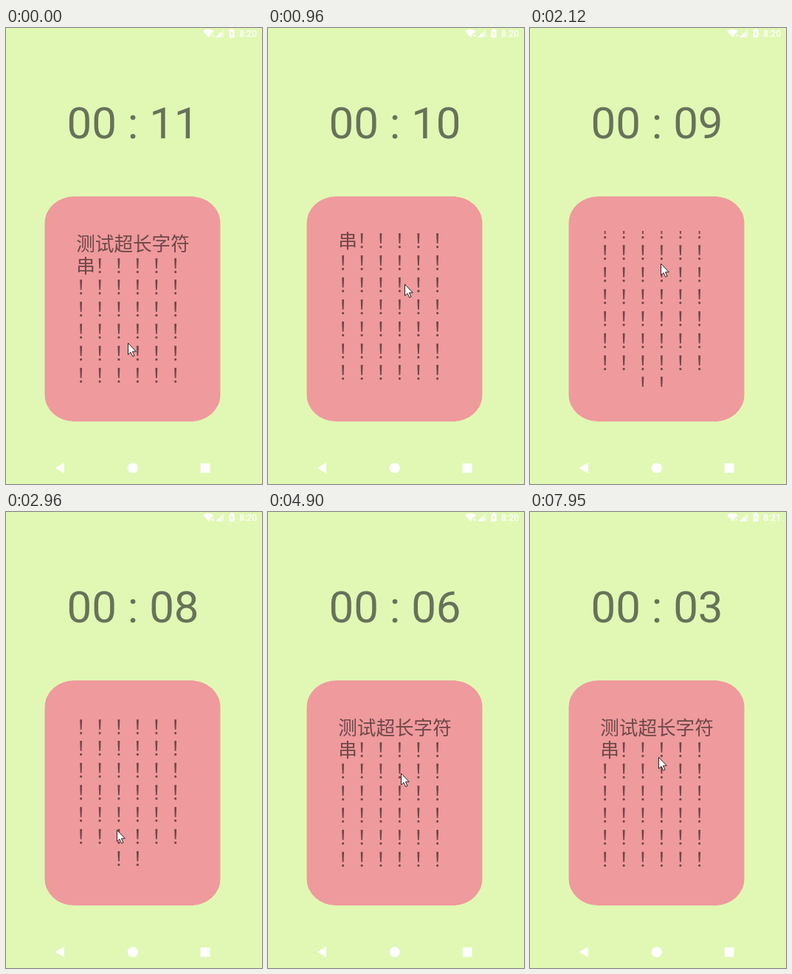
Animation of 347 by 620 pixels, one loop 8 s. Source, as an HTML page:

```html
<!DOCTYPE html>
<html lang="zh-CN">
<head>
<meta charset="utf-8">
<style>
  html, body { margin: 0; width: 100%; height: 100%; overflow: hidden; background: #e1f8b4; }
  svg { display: block; width: 347px; height: 620px; }
  .latin { font-family: Roboto, sans-serif; }
  #message { font: 25.6px "Noto Sans CJK SC", "Noto Sans CJK", sans-serif; text-anchor: middle; fill: #6e4848; }
</style>
</head>
<body>
<svg viewBox="0 0 347 620">
  <defs><clipPath id="viewport"><rect x="84" y="276" width="176" height="212"/></clipPath></defs>
  <rect width="347" height="620" fill="#e1f8b4"/>

  <g fill="#fff">
    <path d="M267 4Q274 -.5 281.500 4L279.500 7H277.500V9.500L274.500 12.500Z"/>
    <path d="M278.500 8.500L282 12M282 8.500L278.500 12" stroke="#fff"/>
    <path d="M295 2V12.500H284Z" opacity=".5"/>
    <path d="M291 6V12.500H284Z"/>
    <path d="M302.500 2.500H304.500V1H307.500V2.500H309.500V13H302.500Z"/>
    <path d="M306.500 4L304 8.300H305.600V11.500L308 7.200H306.500Z" fill="#e1f8b4"/>
    <text id="clock" class="latin" x="340" y="11.700" font-size="12" font-weight="500" text-anchor="end"></text>
    <path d="M66.500 598L79 591V605.500Z"/>
    <circle cx="171.800" cy="598.200" r="7"/>
    <rect x="263.700" y="592" width="12.800" height="12.800"/>
  </g>

  <text id="timer" class="latin" x="172" y="149.500" font-size="60" text-anchor="middle" fill="#67725a"></text>

  <rect x="52.500" y="229" width="238" height="306" rx="40" ry="36" fill="#ef9a9d"/>
  <g clip-path="url(#viewport)"><g id="message"></g></g>
  <path id="cursor" d="M.5 .5V16L4 12.800L6.700 18.500L9 17.400L6.400 11.900H11.300Z"
        fill="#fff" stroke="#222" stroke-width="1"/>
</svg>
<script>
const LOOP = 8000, STEP = 76.7, FIRST_STEP = 340, LINE = 29.83;
const el = id => document.getElementById(id);

const bangs = n => "\uFF01".repeat(n);
const lines = ["测试超长字符", "串" + bangs(5), ...Array(9).fill(bangs(6)), bangs(2)];
el("message").innerHTML = lines
  .map((line, i) => `<text x="172" y="${302.8 + i * LINE}">${line}</text>`).join("");

// Each move eases from the previous value to a new one.
const pointerMoves = [
  { from: 700, to: 1120, at: [196, 305] },
  { from: 1120, to: 1660, at: [160, 386] },
  { from: 1780, to: 2240, at: [181, 302] },
  { from: 2300, to: 2900, at: [150, 432] },
  { from: 2950, to: 3170, at: [152, 576] },
  { from: 3170, to: 3590, at: [180, 355] },
  { from: 6230, to: 6460, at: [167, 340] },
  { from: 6940, to: 7010, at: [160, 345] },
  { from: 7100, to: 7470, at: [174, 333] }
];
const scrollMoves = [
  { from: 730, to: 1363, at: [116] },
  { from: 1860, to: 2293, at: [150.5] },
  { from: 2940, to: 3400, at: [0] }
];

function ease(from, to, t) {
  const u = Math.min(1, Math.max(0, (t - from) / (to - from)));
  return u * u * (3 - 2 * u);
}

function follow(initial, moves, t) {
  return moves.reduce((value, { from, to, at }) =>
    value.map((v, i) => v + (at[i] - v) * ease(from, to, t)), initial);
}

function draw(now) {
  const t = now % LOOP;
  // Movement advances about 13 times per second.
  const held = FIRST_STEP + Math.floor((t - FIRST_STEP + 8) / STEP) * STEP;
  const [x, y] = follow([165, 428], pointerMoves, held).map(Math.round);
  const [offset] = follow([0], scrollMoves, held);
  const seconds = 10 - Math.floor((t - 844) / 1014);

  el("cursor").setAttribute("transform", `translate(${x} ${y})`);
  el("message").setAttribute("transform", `translate(0 ${-offset})`);
  el("timer").textContent = "00 : " + String(seconds).padStart(2, "0");
  el("clock").textContent = t < 7800 ? "8:20" : "8:21";
}

const start = performance.now();
function frame() {
  draw(performance.now() - start);
  requestAnimationFrame(frame);
}
frame();
</script>
</body>
</html>
```
